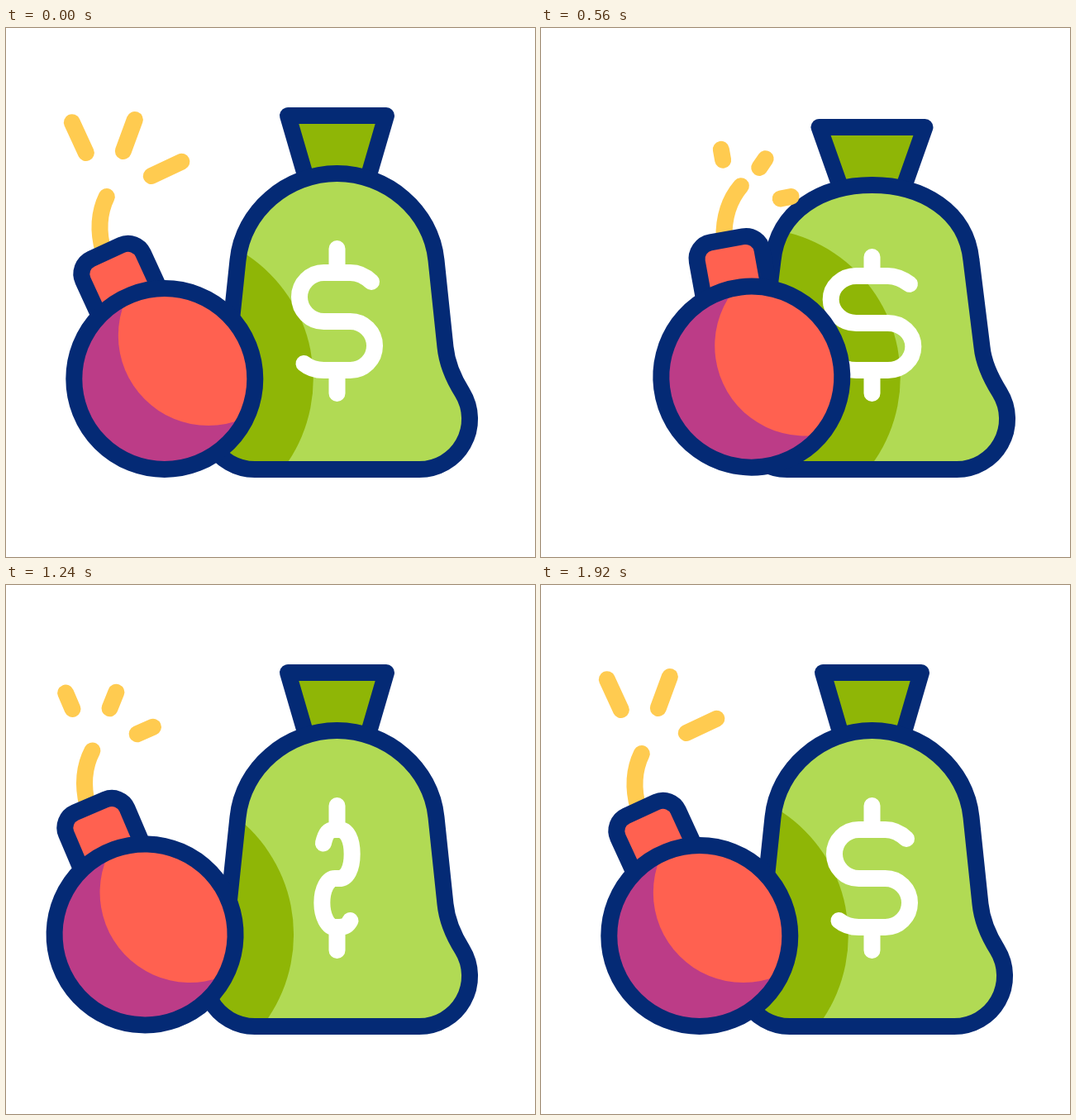
Recreate the animation shown at these times as an HTML page with a canvas. Size 640 px wide and 640 px high, loop 2 s.

```html
<!DOCTYPE html>
<html lang="en">
<head>
<meta charset="utf-8">
<title>Bomb and money bag</title>
<style>
html, body { margin: 0; height: 100%; overflow: hidden; background: #fff; }
canvas { display: block; }
</style>
</head>
<body>
<canvas id="stage" width="640" height="640"></canvas>
<script>
const ctx = document.getElementById('stage').getContext('2d');
const LOOP = 2000, STEP = 40, REST = 120;
const NAVY = '#042a75', LIME = '#b1da54', OLIVE = '#8fb606', RED = '#ff6150',
      PURPLE = '#bc3c87', YELLOW = '#ffcb50', WHITE = '#fff';
const BAG_X = 400.5, BOMB_X = 191.8, BOMB_Y = 424.5, RAD = Math.PI / 180;

const cap = new Path2D('M-40 -85 V-149 A20 20 0 0 1 -20 -169 H20 A20 20 0 0 1 40 -149 V-85');
const fuse = new Path2D('M-70 -220.5 C-80 -200 -81 -179 -74 -154');
const ball = disc(0, 0, 109.5);
// Inner end and angle of each spark, relative to the bomb's centre
const sparks = [[-95, -273.5, -114.7], [-50, -275.5, -69.8], [-16, -245.5, -25.3]];

// Smooth 0 to 1 between two times
function ease(t, from, to) {
  const p = Math.min(1, Math.max(0, (t - from) / (to - from)));
  return p * p * (3 - 2 * p);
}

// Smooth 0 to 1 and back to 0
function bump(t, from, peak, to) {
  return ease(t, from, peak) - ease(t, peak, to);
}

function disc(x, y, r) {
  const path = new Path2D();
  path.arc(x, y, r, 0, 7);
  return path;
}

function fill(path, color) {
  ctx.fillStyle = color;
  ctx.fill(path);
}

function stroke(path, color) {
  ctx.strokeStyle = color;
  ctx.stroke(path);
}

// Draws inside a moved and turned copy of the coordinates
function place(x, y, degrees, paint) {
  ctx.save();
  ctx.translate(x, y);
  ctx.rotate(degrees * RAD);
  paint();
  ctx.restore();
}

// Fills a shape with a base colour and a disc that is cut off at the clip path
function shaded(path, base, spot, color, clip = path) {
  fill(path, base);
  ctx.save();
  ctx.clip(clip);
  fill(spot, color);
  ctx.restore();
  stroke(path, NAVY);
}

function drawBag(squash, shadow) {
  const drop = 14 * squash, rim = 59.5 + 4.5 * squash;
  const neck = new Path2D(`M-38.5 ${178 + drop} L${-rim} ${106 + drop} H${rim} L38.5 ${178 + drop}`);
  fill(neck, OLIVE);
  stroke(neck, NAVY);

  const top = 176 + drop, waist = 131 + 2 * squash, hip = 151.5 + 3 * squash;
  const body = new Path2D(`M0 ${top} C60 ${top} 114 221 120 281 L${waist} 386
    C${waist + 2} 406 ${hip - 10} 425 ${hip} 441 A61 61 0 0 1 ${hip - 52.5} 534
    H${52.5 - hip} A61 61 0 0 1 ${-hip} 441
    C${10 - hip} 425 ${-waist - 2} 406 ${-waist} 386 L-120 281 C-114 221 -60 ${top} 0 ${top} Z`);
  // The shadow spills a little past the left side
  const clip = new Path2D('M-128 345 L-130 432 H-157 L-140 385 Z');
  clip.addPath(body);
  shaded(body, LIME, shadow, OLIVE, clip);
}

// u and v scale the sign without scaling its line; a negative u mirrors it
function drawDollar(u, v, stretch) {
  const flipped = Math.max(0, -u), narrow = Math.abs(u);
  const side = 45.5, bar = 16 * narrow, end = -48 + 9 * (1 - narrow);
  const bend = bar + (side - bar) * .55;
  const square = .55 + .35 * flipped ** 2;
  const corner = bar + (side - bar) * square, rise = 29.5 * square;
  const p = (x, y) => `${x * u} ${y * v} `;
  stroke(new Path2D(
    'M' + p(41.5, end) + 'C' + p(34, -55) + p(26, -59) + p(bar, -59) + 'L' + p(-bar, -59) +
    'C' + p(-corner, -59) + p(-side, -29.5 - rise) + p(-side, -29.5) +
    'C' + p(-side, -29.5 + rise) + p(-corner, 0) + p(-bar, 0) + 'L' + p(bar, 0) +
    'C' + p(bend, 0) + p(side, 13) + p(side, 29.5) + 'S' + p(bend, 59) + p(bar, 59) +
    'L' + p(-bar, 59) + 'C' + p(-26, 59) + p(-34, 56) + p(-40, 51) +
    `M0 ${-59 * v} v${-29 - 6 * stretch} M0 ${59 * v} v28`), WHITE);
}

function drawBomb(turn, sparkLength) {
  stroke(fuse, YELLOW);
  // Sparks lag behind the turning bomb
  place(-.27 * turn, 1.94 * turn, 0, () => {
    for (const [x, y, angle] of sparks) {
      place(x, y, angle, () => stroke(new Path2D(`M0 0 H${sparkLength}`), YELLOW));
    }
  });
  place(0, 0, -24.7, () => {
    fill(cap, RED);
    stroke(cap, NAVY);
  });
  shaded(ball, PURPLE, disc(53, -52.5, 109), RED);
}

function draw(now) {
  let t = Math.floor(now % LOOP / STEP) * STEP;
  if (t < REST) t = 0;

  // The bomb rolls right under the jumping bag, then left, then home
  const right = bump(t, 33, 480, 960), left = bump(t, 480, 960, 1425);
  const x = BOMB_X + 73.5 * right - 68 * left;
  const y = BOMB_Y - 2.2 * right - 4.6 * left;
  const turn = 14.7 * bump(t, 60, 480, 1440);
  const glow = 1 - .7 * ease(t, 60, 390) + .22 * ease(t, 390, 1240) + .48 * ease(t, 1240, 1440);

  const lift = -70 * bump(t, 40, 310, 500);
  const squash = bump(t, 500, 560, 720);
  const hop = bump(t, 40, 200, 560);
  const stretch = hop - squash;
  const flip = 1 - 2 * bump(t, 960, 1400, 1920);

  ctx.fillStyle = WHITE;
  ctx.fillRect(0, 0, 640, 640);
  place(BAG_X, lift, 0, () => drawBag(squash, disc(x - BAG_X, y - lift, 180)));
  place(BAG_X, 355 + lift - 9 * hop + 2 * squash, 0,
    () => drawDollar(flip * (1 - .095 * stretch), 1 - .034 * squash, stretch));
  place(x, y, turn, () => drawBomb(turn, 40.5 * glow));
  requestAnimationFrame(draw);
}

ctx.lineWidth = 20;
ctx.lineCap = ctx.lineJoin = 'round';
requestAnimationFrame(draw);
</script>
</body>
</html>
```
